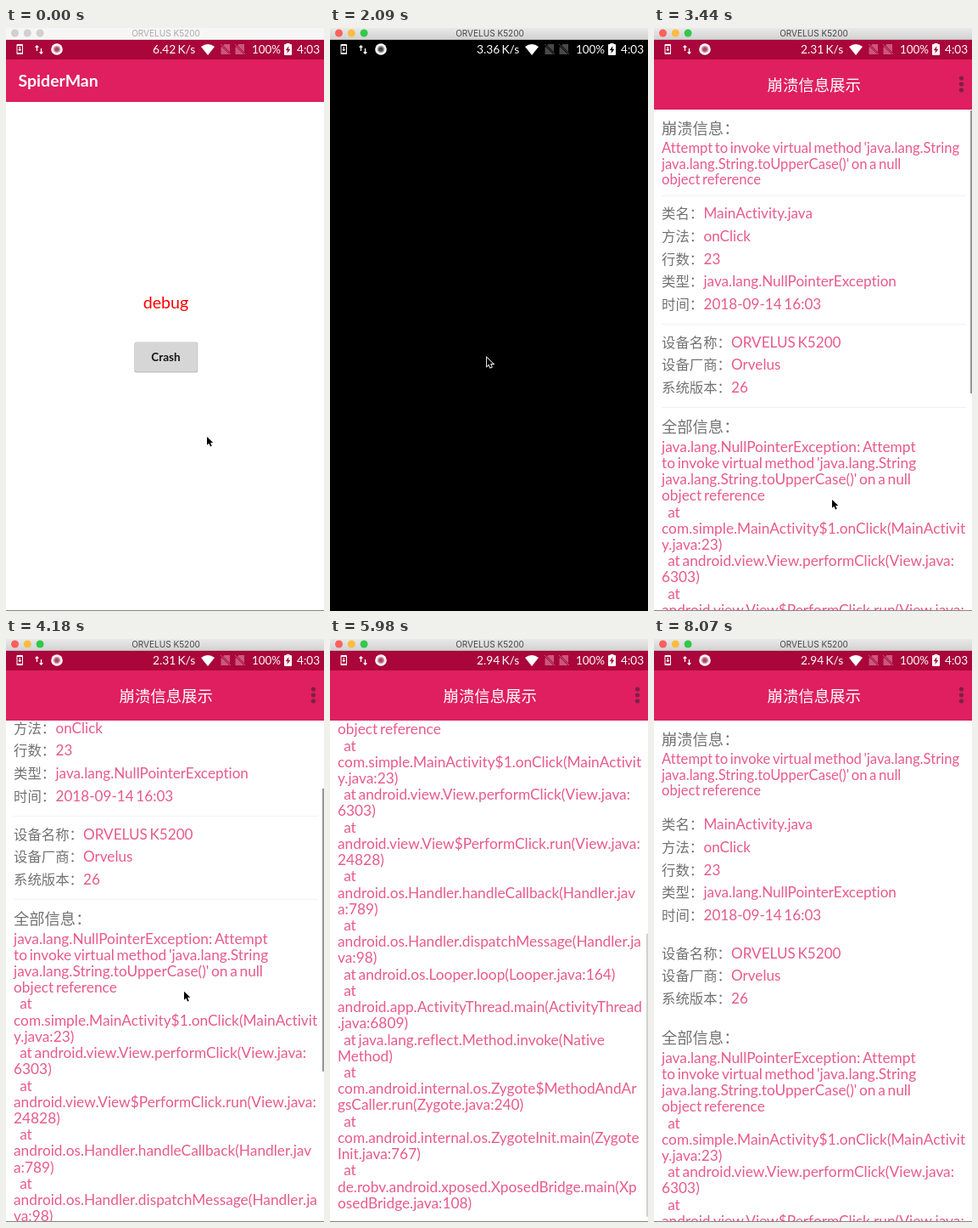
Write an HTML page with a canvas that moves like this. It is 375x686 px and loops after 8170 ms.

```html
<!DOCTYPE html>
<html lang="zh-CN">
<head>
<meta charset="utf-8">
<title>Crash report demo</title>
<style>
  html, body { margin: 0; width: 100%; height: 100%; overflow: hidden; background: #fff; }
  canvas { display: block; width: 375px; height: 686px; }
</style>
</head>
<body>
<canvas id="stage"></canvas>
<script>
const W = 375, H = 686, LOOP = 8170, STEP = 149.4;
const canvas = document.getElementById('stage');
const ctx = canvas.getContext('2d');
const ratio = window.devicePixelRatio || 1;
canvas.width = W * ratio;
canvas.height = H * ratio;

const LATIN = 'Lato, "Noto Sans CJK SC", "Noto Sans CJK", sans-serif';
const HAN = '"Noto Sans CJK SC", "Noto Sans CJK", sans-serif';
const PINK = '#e85a8c', BAR = '#df1f5f', STATUS = '#aa063b', GRAY = '#727272';
const DEVICE = 'ORVELUS K5200';
const T = { press: 1040, focus: 1190, release: 1340, black: 1780, report: 2380 };

const MESSAGE = [
  "Attempt to invoke virtual method 'java.lang.String",
  "java.lang.String.toUpperCase()' on a null",
  'object reference'
];
const DETAILS = [
  ['类名：', 'MainActivity.java'],
  ['方法：', 'onClick'],
  ['行数：', '23'],
  ['类型：', 'java.lang.NullPointerException'],
  ['时间：', '2018-09-14 16:03']
];
const DEVICE_ROWS = [['设备名称：', DEVICE], ['设备厂商：', 'Orvelus'], ['系统版本：', '26']];
const TRACE = `java.lang.NullPointerException: Attempt
to invoke virtual method 'java.lang.String
java.lang.String.toUpperCase()' on a null
object reference
  at
com.simple.MainActivity$1.onClick(MainActivit
y.java:23)
  at android.view.View.performClick(View.java:
6303)
  at
android.view.View$PerformClick.run(View.java:
24828)
  at
android.os.Handler.handleCallback(Handler.jav
a:789)
  at
android.os.Handler.dispatchMessage(Handler.ja
va:98)
  at android.os.Looper.loop(Looper.java:164)
  at
android.app.ActivityThread.main(ActivityThread
.java:6809)
  at java.lang.reflect.Method.invoke(Native
Method)
  at
com.android.internal.os.Zygote$MethodAndAr
gsCaller.run(Zygote.java:240)
  at
com.android.internal.os.ZygoteInit.main(Zygote
Init.java:767)
  at
de.robv.android.xposed.XposedBridge.main(Xp
osedBridge.java:108)`.split('\n');

const holdTime = t => Math.floor((t + 8) / STEP) * STEP;

function ease(t, from, to) {
  const u = Math.min(1, Math.max(0, (t - from) / (to - from)));
  return u * u * (3 - 2 * u);
}

// Two drags up through the report, then one flick back to the top.
const scrollAt = t =>
  241 * ease(t, 3440, 4780) + 203 * ease(t, 4930, 5830) - 444 * ease(t, 6570, 7634);

const thumbAlpha = t =>
  1 - ease(t, 5700, 6200) + ease(t, 6570, 6720) - ease(t, 7620, 7920);

function cursorAt(t) {
  const toButton = ease(t, 0, 1050), toText = ease(t, 2540, 3290);
  const regrip = ease(t, 4200, 4780), back = ease(t, 5900, 6500);
  return {
    x: 236 - 52 * toButton + 25 * toText - 5 * regrip + 4 * back,
    y: 480 - 93 * toButton + 167 * toText - scrollAt(t) + 265 * regrip + 53 * back
  };
}

function rect(x, y, w, h, color) {
  ctx.fillStyle = color;
  ctx.fillRect(x, y, w, h);
}

function round(x, y, w, h, r, color) {
  ctx.fillStyle = color;
  ctx.beginPath();
  ctx.roundRect(x, y, w, h, r);
  ctx.fill();
}

function disc(x, y, r, color) {
  ctx.fillStyle = color;
  ctx.beginPath();
  ctx.arc(x, y, r, 0, Math.PI * 2);
  ctx.fill();
}

function shape(path, x, y, fill, stroke, width = 1, scale = 1) {
  ctx.save();
  ctx.translate(x, y);
  ctx.scale(scale, scale);
  const p = new Path2D(path);
  if (stroke) {
    ctx.strokeStyle = stroke;
    ctx.lineWidth = width;
    ctx.stroke(p);
  }
  if (fill) {
    ctx.fillStyle = fill;
    ctx.fill(p);
  }
  ctx.restore();
}

function text(str, x, y, size, color, { family = LATIN, weight = 400, align = 'left' } = {}) {
  ctx.font = `${weight} ${size}px ${family}`;
  ctx.letterSpacing = '0.01px'; // turns ligatures off
  ctx.wordSpacing = family === LATIN ? `${-size / 10}px` : '0px';
  ctx.textAlign = align;
  ctx.fillStyle = color;
  ctx.fillText(str, x, y);
}

function drawTitleBar(active) {
  const g = ctx.createLinearGradient(0, 0, 0, 14);
  g.addColorStop(0, active ? '#e9e9e9' : '#f6f6f6');
  g.addColorStop(1, active ? '#d1d1d1' : '#f6f6f6');
  rect(0, 0, W, 14, g);
  rect(0, 13, W, 1, active ? '#b8b8b8' : '#dedede');
  ['#fc605c', '#fdbc40', '#34c84a'].forEach((c, i) => disc(10.5 + i * 14.8, 6, 4.5, active ? c : '#d0d0d0'));
  text(DEVICE, 188.5, 10, 10, active ? '#454545' : '#a9a9a9', { family: 'Inter, sans-serif', align: 'center' });
}

function drawStatusBar(bg, speed, dark) {
  rect(0, 14, W, 23, bg);
  round(12.5, 19, 7.5, 12, 1, '#fff');
  rect(13.5, 21, 5.5, 8, bg);
  shape('M-.6-3h1.2v3H2L0 2.5-2 0h1.4z', 16.25, 25, '#fff');
  shape('M-2.5 2v-6M-4.3-2.2-2.5-4-.7-2.2M2.5-1v6M.7 3.2 2.5 5 4.3 3.2', 39, 25, null, '#fff', 1.3);
  disc(60, 25, 6.8, '#fff');
  disc(60, 25, 4.3, dark ? '#999' : '#d993aa');
  disc(60, 25, 2.6, dark ? '#444' : '#a14b69');
  text(speed + ' K/s', 173, 30, 13.8, '#fff');
  shape('M0 7-8-3Q0-9 8-3z', 238, 25, '#fff');
  const faded = dark ? '#484848' : '#c9587c';
  for (const x of [259, 276]) {
    shape('M-5.5-2-1.5-6H5V6H-5.5z', x, 25, faded);
    shape('M-6-6 6 6', x, 25, null, bg, 2.4);
    shape('M-6-6 6 6', x, 25, null, faded);
  }
  text('100%', 290, 30, 13.4, '#fff');
  round(328, 19, 9, 13, 1, '#fff');
  rect(330.5, 18, 4, 2, '#fff');
  shape('M1-4.5-2.8.8h2.3L-1 4.5 2.8-.8H.5z', 332.5, 25.5, bg);
  text('4:03', 343, 30, 13.6, '#fff');
}

function drawHome(t) {
  rect(0, 37, W, 50, BAR);
  text('SpiderMan', 14.5, 69, 19.5, '#fff', { weight: 700 });
  text('debug', 188.5, 329.5, 19.6, '#f00', { align: 'center' });
  const pressed = t >= T.press && t < T.release;
  round(151.3, 369.5, 75, 36, 2.5, '#c3c3c3');
  round(152, 370, 73.5, 34, 2, pressed ? '#bdbdbd' : '#d6d6d6');
  text('Crash', 188.5, 391.5, 13.5, '#151515', { weight: 700, align: 'center' });
}

function drawRows(rows, top, valueX) {
  rows.forEach(([label, value], i) => {
    const y = top + i * 26.6;
    text(label, 9, y, 16.4, GRAY, { family: HAN });
    text(value, valueX, y, 17.1, PINK);
  });
}

function drawReport(t) {
  const scroll = scrollAt(t);
  ctx.save();
  ctx.beginPath();
  ctx.rect(0, 96, W, H - 96);
  ctx.clip();
  ctx.translate(0, -scroll);
  if (t < 5680) {
    for (const y of [197, 348, 446]) rect(9, y, 359, 1, '#f1f1f1');
  }
  text('崩溃信息：', 9, 125, 18.3, GRAY, { family: HAN });
  MESSAGE.forEach((s, i) => text(s, 9, 147 + i * 18.5, 16.6, PINK));
  drawRows(DETAILS, 224.3, 58.5);
  drawRows(DEVICE_ROWS, 375.7, 91);
  text('全部信息：', 9, 475.7, 18.3, GRAY, { family: HAN });
  TRACE.forEach((s, i) => text(s, 9, 498.7 + i * 19.22, 17.3, PINK));
  ctx.restore();

  ctx.globalAlpha = thumbAlpha(t);
  rect(373, 97 + scroll * 0.5625, 2, 333, '#959595');
  ctx.globalAlpha = 1;

  rect(0, 37, W, 59, BAR);
  text('崩溃信息展示', 133.5, 73.7, 18.4, '#fff', { family: HAN });
  for (const y of [59, 66, 73]) disc(362.5, y, 2.6, '#7d2044');
}

function drawCursor(t) {
  if ((t > 5800 && t < 6560) || t > 7600) return;
  const { x, y } = cursorAt(t);
  shape('M0 0V11.2L2.6 8.8 4.6 13.2 6.5 12.3 4.6 8H8.2z', x + 1, y + 1, '#000', '#fff', 2, 0.88);
}

function render(t) {
  ctx.setTransform(ratio, 0, 0, ratio, 0, 0);
  const dark = t >= T.black && t < T.report;
  rect(0, 0, W, H, dark ? '#000' : '#fff');
  if (t < T.black) drawHome(t);
  else if (!dark) drawReport(t);
  const speed = t < T.black ? '6.42' : dark ? '3.36' : t < 5500 ? '2.31' : '2.94';
  drawStatusBar(dark ? '#000' : STATUS, speed, dark);
  drawTitleBar(t >= T.focus);
  if (!dark) rect(0, 685, W, 1, '#858585');
  drawCursor(t);
}

function tick() {
  render(holdTime(performance.now() % LOOP));
  requestAnimationFrame(tick);
}
tick();
</script>
</body>
</html>
```
